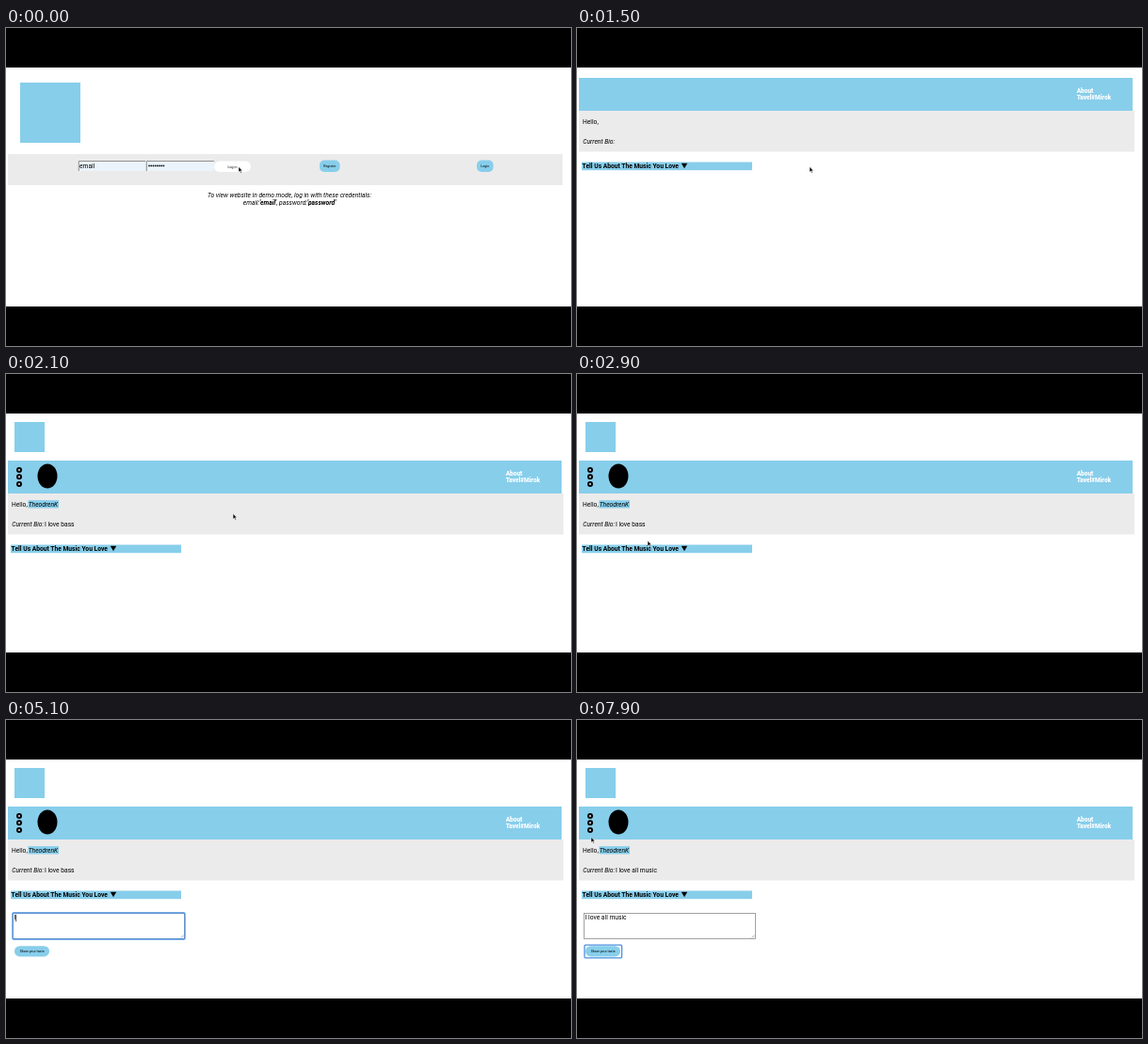
An HTML page for the animation above (8 s loop, 600x338 px).

```html
<!DOCTYPE html>
<html lang="en">
<head>
<meta charset="utf-8">
<title>Music profile demo</title>
<style>
  html, body { margin: 0; width: 100%; height: 100%; overflow: hidden; background: #fff; }
  svg { display: block; width: 100vw; height: 100vh; }
  text { font: 6.7px Roboto, sans-serif; white-space: pre; }
  .small { font-size: 3.6px; text-anchor: middle; }
  .mid { text-anchor: middle; }
  .italic { font-style: italic; }
  .bold { font-weight: 700; }
  .brand { font-size: 6.5px; font-weight: 900; fill: #fff; }
  .sky { fill: #87ceeb; }
  .panel { fill: #ebebeb; }
  .ring { fill: none; stroke: #4a8fe0; stroke-width: 1.3; }
</style>
</head>
<body>
<svg viewBox="0 0 600 338" preserveAspectRatio="none">
  <rect width="600" height="338" fill="#fff"/>

  <g id="login">
    <rect class="sky" x="15" y="58" width="64" height="64"/>
    <rect class="panel" x="2" y="134" width="589" height="33"/>
    <g fill="#eaf4fa">
      <rect x="77" y="141" width="71" height="11"/>
      <rect x="149" y="141" width="72" height="11"/>
    </g>
    <path d="M77.3 152V141.5H148M149.3 152V141.5H221" fill="none" stroke="#777" stroke-width=".8"/>
    <text x="78" y="149">email</text>
    <g id="dots"></g>
    <rect x="221" y="141.5" width="39" height="11.5" rx="5.7" fill="#fff"/>
    <text class="small" x="240.5" y="148.8">Log in</text>
    <rect class="sky" x="333" y="140.5" width="21.5" height="12.5" rx="5"/>
    <text class="small" x="343.8" y="148">Register</text>
    <rect class="sky" x="500" y="140.5" width="17.5" height="12.5" rx="5"/>
    <text class="small" x="508.8" y="148">Login</text>
    <text class="italic mid" x="301" y="179.7">To view website in demo mode, log in with these credentials:</text>
    <text class="italic mid" x="301" y="187.7">email:<tspan class="bold">'email'</tspan>, password:<tspan class="bold">'password'</tspan></text>
  </g>

  <g id="profile">
    <rect class="sky" x="2" y="92" width="588" height="35"/>
    <rect class="panel" x="2" y="127" width="590" height="43.5"/>
    <text class="brand" x="530.7" y="107.6">About</text>
    <text class="brand" x="530.7" y="115.4">Tavel#Mirok</text>
    <text x="6" y="140.6">Hello,</text>
    <text class="italic" x="6.3" y="161.7">Current Bio:</text>
    <rect class="sky" x="5" y="181.5" width="181" height="8.7"/>
    <text class="bold" x="5.6" y="188.4">Tell Us About The Music You Love</text>
    <path d="M110.8 182.8h6.4l-3.2 5.4z"/>

    <g id="images">
      <rect class="sky" x="9" y="51" width="32" height="32"/>
      <g fill="#d8eef7" stroke="#000" stroke-width="2">
        <circle cx="14" cy="102" r="2"/>
        <circle cx="14" cy="109.3" r="2"/>
        <circle cx="14" cy="117" r="2"/>
      </g>
      <ellipse cx="44" cy="108.5" rx="10.5" ry="13"/>
    </g>

    <g id="user">
      <rect class="sky" x="23.5" y="134.2" width="32.5" height="8.3"/>
      <text class="italic" x="23.7" y="140.6">TheodrenK</text>
      <text id="bio" x="41" y="161.7"></text>
    </g>

    <g id="form">
      <rect x="7.5" y="205.5" width="182" height="27" fill="#fff" stroke="#8a8a8a" stroke-width=".8"/>
      <path d="M185.5 231.5l3-3M187.3 231.5l1.2-1.2" stroke="#777" stroke-width=".5"/>
      <rect id="areaRing" class="ring" x="7" y="205" width="183" height="28" rx="1"/>
      <text id="entry" x="8.6" y="212.3"></text>
      <rect id="caret" y="206.8" width=".7" height="7.4"/>
      <rect class="sky" x="9" y="240.2" width="37" height="11.3" rx="5.6"/>
      <text class="small" x="27.6" y="247.1">Share your taste</text>
      <rect id="buttonRing" class="ring" x="8" y="239.2" width="39.6" height="13.6" rx="1"/>
    </g>
  </g>

  <path id="cursor" d="M0 0V5.8L1.4 4.6L2.4 6.8L3.3 6.4L2.3 4.3H4.1Z" fill="#000" stroke="#fff" stroke-width=".5"/>
  <path d="M0 0H600V42H0ZM0 296H600V338H0Z"/>
</svg>
<script>
const LOOP = 8000, STEP = 100;
const $ = id => document.getElementById(id);
const show = (id, on) => $(id).setAttribute('display', on ? 'inline' : 'none');

const MESSAGE = 'I love all music';
// [time, number of letters typed]
const TYPING = [[5100, 1], [5200, 2], [5300, 3], [5400, 4], [5500, 5], [5600, 6], [5800, 8],
  [6000, 9], [6100, 10], [6200, 12], [6400, 14], [6500, 15], [6600, 16]];
// [time, x, y] of the pointer tip
const POINTER = [[0, 247, 147.4], [2000, 247, 147.4], [2900, 75, 177.2], [3100, 75, 184],
  [3300, 75, 184], [3800, 74, 235], [4200, 72, 216], [6800, 72, 216], [7300, 33, 245],
  [7600, 33, 245], [7900, 15, 124.5]];

for (let i = 0; i < 8; i++) {
  $('dots').insertAdjacentHTML('beforeend', `<circle cx="${152 + i * 2.2}" cy="146.4" r=".85"/>`);
}

const ease = p => p * p * (3 - 2 * p);

function pointerAt(t) {
  const next = POINTER.findIndex(k => k[0] > t);
  if (next < 0) return POINTER.at(-1).slice(1);
  const [t0, x0, y0] = POINTER[next - 1], [t1, x1, y1] = POINTER[next];
  const p = ease((t - t0) / (t1 - t0));
  return [x0 + (x1 - x0) * p, y0 + (y1 - y0) * p];
}

function lettersAt(t) {
  return TYPING.reduce((count, [time, n]) => t >= time ? n : count, 0);
}

function draw(t) {
  const loggedIn = t >= 1500, loaded = t >= 1600, focused = t >= 4500 && t < 7400;
  show('login', !loggedIn);
  show('profile', loggedIn);
  show('images', loaded);
  $('profile').setAttribute('transform', `translate(0 ${loaded ? 0 : -39})`);
  show('user', t >= 1700);
  $('bio').textContent = t >= 7600 ? MESSAGE : 'I love bass';

  show('form', t >= 3200);
  show('areaRing', focused);
  show('buttonRing', t >= 7400);
  const typed = MESSAGE.slice(0, lettersAt(t));
  const entry = $('entry');
  entry.textContent = typed || 'Info';
  entry.setAttribute('fill', typed ? '#000' : '#777');
  show('caret', focused);
  if (focused) {
    $('caret').setAttribute('x', 8.6 + (typed ? entry.getComputedTextLength() : 0));
  }

  show('cursor', t < 5100 || t >= 6900);
  $('cursor').setAttribute('transform', `translate(${pointerAt(t)})`);
}

const start = performance.now();
function tick() {
  const t = (performance.now() - start) % LOOP;
  draw(Math.floor(t / STEP) * STEP);
  requestAnimationFrame(tick);
}
tick();
</script>
</body>
</html>
```
